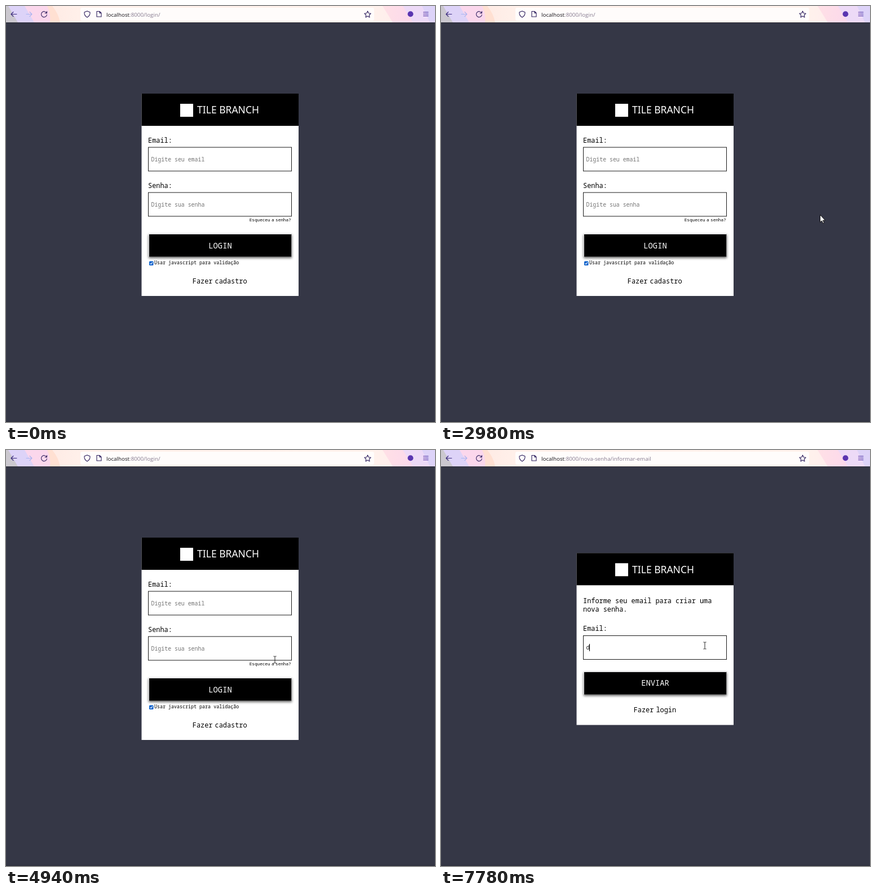
Write an HTML page that moves like this. It is 761 px wide and 736 px high and loops after 8 s.

```html
<!DOCTYPE html>
<html lang="pt">
<head>
<meta charset="utf-8">
<title>Login</title>
<style>
  html, body { margin: 0; width: 100%; height: 100%; overflow: hidden; background: #353746; }
  svg { display: block; width: 100vw; height: 100vh; }
  text { font: 500 11.9px "Noto Sans Mono", "DejaVu Sans Mono", monospace; white-space: pre; }
  .title { font: 17.5px "Noto Sans", "Open Sans", sans-serif; fill: #fff; text-anchor: middle; }
  .hint, .typed { font-size: 9.9px; font-weight: 400; }
  .hint { fill: #757575; }
  .typed { fill: #222; }
  .action { font-size: 13.8px; fill: #fff; text-anchor: middle; }
  .small { font-size: 8.35px; }
  .tiny { font-size: 7.7px; word-spacing: -2.2px; }
  .link { word-spacing: -3.1px; }
  .ui { font: 9.8px "Open Sans", "Noto Sans", sans-serif; fill: #857a8f; }
  .host { fill: #15141a; }
  .status { font: 8.2px "Open Sans", "Noto Sans", sans-serif; fill: #38383d; }
  .icon { fill: none; stroke: #2b1c5c; stroke-width: 1.1; stroke-linecap: round; stroke-linejoin: round; }
  .shadow { filter: drop-shadow(0 2px 2px rgba(0, 0, 0, .6)); }
</style>
</head>
<body>
<svg viewBox="0 0 761 736" preserveAspectRatio="none">
  <defs>
    <linearGradient id="sky">
      <stop offset="0" stop-color="#fde3dc"/><stop offset=".17" stop-color="#fff0ea"/>
      <stop offset=".85" stop-color="#fff2ec"/><stop offset="1" stop-color="#ffe6ee"/>
    </linearGradient>
    <linearGradient id="rose">
      <stop offset="0" stop-color="#ffe0e6"/><stop offset="1" stop-color="#f9d3ef"/>
    </linearGradient>
    <g id="header">
      <rect x="240.5" width="278.5" height="57"/>
      <rect x="309" y="18" width="23" height="23" fill="#fff"/>
      <text class="title" x="394" y="35.3">TILE BRANCH</text>
    </g>
    <rect id="field" x="252.5" y=".5" width="254" height="42" fill="#fff" stroke="#1a1a1a"/>
    <g id="button">
      <path class="shadow" fill="#dedee0" d="M253 0H507V41H253Z"/>
      <path fill="#9c9c9e" d="M507 0V41H253L254 40H506V1Z"/>
      <rect x="254" y="1" width="252" height="39.5"/>
    </g>
  </defs>

  <rect width="761" height="736" fill="#353746"/>
  <rect y="734" width="761" height="2" fill="#2f313e"/>

  <g id="toolbar">
    <rect width="761" height="29" fill="url(#sky)"/>
    <path fill="#ffe0d2" d="M70 0H82Q93 13 96 29H70Z"/>
    <path fill="#fbd7ec" d="M30 0H73Q80 14 78 29H45Z"/>
    <path fill="#ddd3f8" d="M0 0H33L50 29H0Z"/>
    <path fill="#cbc8cf" d="M0 0H4L21 29H0Z"/>
    <path fill="url(#rose)" d="M668 0H761V29H686Z"/>
    <path fill="#eddaf7" d="M704 0H761V29H722Z"/>
    <path fill="#ddd3f8" d="M738 0H761V29H752Z"/>
    <rect y="29" width="761" height="1" fill="#2a2b37"/>
    <rect x="132" y="3" width="521" height="23" rx="3" fill="#fffcfb"/>
    <g class="icon">
      <path d="M9 14.5H19M13 10.5L9 14.5L13 18.5" stroke="#3a2a80"/>
      <path d="M36 14.5H46M42 10.5L46 14.5L42 18.5" stroke="#a9b4f0"/>
      <path id="reload" d="M71.8 12A5 5 0 1 0 72.5 15.5M72.5 9.5V12.7H69.2"/>
      <path id="stop" d="M63.5 10.5L71.5 18.5M71.5 10.5L63.5 18.5"/>
      <path d="M144 9L149 11Q149.5 17 144 20Q138.5 17 139 11Z"/>
      <path d="M161 9.5H166L169 12.5V19H161ZM166 9.5V12.5H169"/>
      <path d="M641.5 9L643.2 12.7L647.2 13.2L644.3 16L645 20L641.5 18L638 20L638.7 16L635.8 13.2L639.8 12.7Z"/>
      <path d="M740.5 11H749M740.5 14.3H749M740.5 17.5H749" stroke="#4a2aa0"/>
    </g>
    <circle cx="717.5" cy="14.3" r="5" fill="#5a35b0"/>
    <text class="ui" x="178" y="18.5"><tspan class="host">localhost</tspan>:8000/<tspan id="path"></tspan></text>
  </g>

  <g id="login">
    <rect x="240.5" y="155" width="278.5" height="358" fill="#fff"/>
    <use href="#header" y="155"/>
    <text x="252" y="242">Email:</text>
    <use href="#field" y="249.5"/>
    <text class="hint" x="257.5" y="275">Digite seu email</text>
    <text x="252" y="322">Senha:</text>
    <use href="#field" y="329.5"/>
    <text class="hint" x="257.5" y="354.5">Digite sua senha</text>
    <text class="tiny" x="431.7" y="380.5">Esqueceu a senha?</text>
    <use href="#button" y="403"/>
    <rect id="hover" x="254" y="404" width="252" height="39.5" fill="#1c1c1c"/>
    <text class="action" x="380" y="429">LOGIN</text>
    <rect x="254" y="451.5" width="7.5" height="7.5" rx="1.5" fill="#0b62cc"/>
    <path d="M255.7 455.3L257.2 456.9L260 453.3" fill="none" stroke="#fff" stroke-width="1.1"/>
    <text class="small" x="263" y="457.3">Usar javascript para validação</text>
    <text class="link" x="330.8" y="490.5">Fazer cadastro</text>
  </g>

  <g id="recover">
    <rect x="240.5" y="182.5" width="278.5" height="304" fill="#fff"/>
    <use href="#header" y="182.3"/>
    <text x="252" y="270.5">Informe seu email para criar uma</text>
    <text x="252" y="286.3">nova senha.</text>
    <text x="252" y="320.3">Email:</text>
    <use href="#field" y="328"/>
    <text id="hint" class="hint" x="257.5" y="353">Digite seu email</text>
    <text id="typed" class="typed" x="257.5" y="353">d</text>
    <rect id="caret" x="257" y="343" width="1" height="13"/>
    <use href="#button" y="392"/>
    <text class="action" x="380" y="417">ENVIAR</text>
    <text class="link" x="341.7" y="464">Fazer login</text>
  </g>

  <g id="status">
    <rect id="statusBox" y="723" height="13" fill="#f9f9fb"/>
    <text id="statusText" class="status" x="0" y="734"></text>
  </g>

  <g id="cursor" stroke-linejoin="round">
    <path id="arrow" d="M.5 .5V13.7L3.5 11L5.7 15.5L7.6 14.6L5.5 10.2H9.5Z" fill="#fff" stroke="#000" stroke-width=".9"/>
    <path id="beam" d="M-2.5 -6H-.5L0 -5.5L.5 -6H2.5M0 -5.5V5.5M-2.5 6H-.5L0 5.5L.5 6H2.5" fill="none" stroke="#222"/>
    <path id="hand" d="M-1 1Q0 -.5 1 1V6L6 7Q8 7.5 7.5 10L6.5 15H-.5L-4.5 9.5Q-4.5 7.5 -1 9Z" fill="#fff" stroke="#000" stroke-width=".9"/>
  </g>
</svg>
<script>
const LOOP = 8000, ENTER = 650, STEP = 68.7;
const LINK = 5280, CLICK = 5620, LOADING = 5690, LOADED = 6110, READY = 6700, FOCUS = 7510, TYPE = 7780;

// Pointer path: time, x, y
const route = [
  [650, 430, 725], [840, 190, 470], [1020, 340, 188], [1200, 720, 330], [1410, 508, 533],
  [1600, 58, 350], [1800, 260, 25], [2050, 590, 180], [2240, 560, 390],
  [2420, 350, 498], [2590, 117, 310], [2780, 380, 126], [2980, 672, 364],
  [3190, 430, 508], [3370, 189, 330], [3540, 430, 126], [3700, 737, 250], [3890, 562, 398],
  [4170, 470, 388], [4450, 430, 430], [4730, 460, 424], [4900, 477, 371], [5140, 477, 371],
  [5280, 482, 377], [6360, 482, 377], [6700, 470, 362], [7170, 453, 352], [7310, 468, 346], [8000, 468, 346]
];

const el = id => document.getElementById(id);
const show = (id, on) => { el(id).style.display = on ? '' : 'none'; };
const inside = (x, y, l, t, r, b) => x >= l && x <= r && y >= t && y <= b;

// Slope at a point, flat at turning points so that the path stays within its extremes
function slope(i, axis) {
  const a = route[i - 1], b = route[i], c = route[i + 1];
  if (!a || !c || (b[axis] - a[axis]) * (c[axis] - b[axis]) <= 0) return 0;
  return (c[axis] - a[axis]) / (c[0] - a[0]);
}

function pointer(t) {
  let i = 0;
  while (i < route.length - 2 && t >= route[i + 1][0]) i++;
  const a = route[i], b = route[i + 1], span = b[0] - a[0];
  const u = Math.min(1, Math.max(0, (t - a[0]) / span)), v = 1 - u;
  return [1, 2].map(k => Math.round(
    v * v * (1 + 2 * u) * a[k] + u * u * (3 - 2 * u) * b[k] +
    span * u * v * (v * slope(i, k) - u * slope(i + 1, k))));
}

function pointerShape(x, y, t) {
  if (t >= CLICK && t < LOADED) return 'arrow';
  const first = t < LOADED;
  const fields = first ? [250, 330] : [328];
  if (fields.some(top => inside(x, y, 252, top, 507, top + 43))) return 'beam';
  const links = first
    ? [[253, 403, 507, 444], [431, 374, 507, 383], [331, 479, 428, 493]]
    : [[253, 392, 507, 433], [342, 453, 417, 467]];
  return links.some(box => inside(x, y, ...box)) ? 'hand' : 'arrow';
}

function draw(t) {
  const moved = ENTER + Math.floor((t - ENTER) / STEP + .15) * STEP;
  const [x, y] = pointer(moved);
  const shape = pointerShape(x, y, t);
  show('cursor', t >= ENTER);
  el('cursor').setAttribute('transform', `translate(${x} ${y})`);
  for (const id of ['arrow', 'beam', 'hand']) show(id, id === shape);

  const waiting = t >= LOADING && t < READY;
  show('reload', !waiting);
  show('stop', waiting);
  el('stop').style.opacity = t < LOADED ? 1 : .25;
  el('path').textContent = t < LOADING ? 'login/' : 'nova-senha/informar-email';

  show('login', t < LOADED);
  show('recover', t >= LOADED);
  show('hover', t >= ENTER && inside(x, y, 253, 403, 507, 444));

  show('status', t >= LINK && t < LOADED);
  el('statusBox').setAttribute('width', t < LOADING ? 172 : 192);
  el('statusText').textContent = t < LOADING
    ? 'localhost:8000/nova-senha/informar-email' : 'Transferindo dados de localhost...';

  show('hint', t < TYPE);
  show('typed', t >= TYPE);
  show('caret', t >= FOCUS);
  el('caret').setAttribute('x', t < TYPE ? 257 : 263);
}

const start = performance.now();
function frame() {
  draw((performance.now() - start) % LOOP);
  requestAnimationFrame(frame);
}
frame();
</script>
</body>
</html>
```
